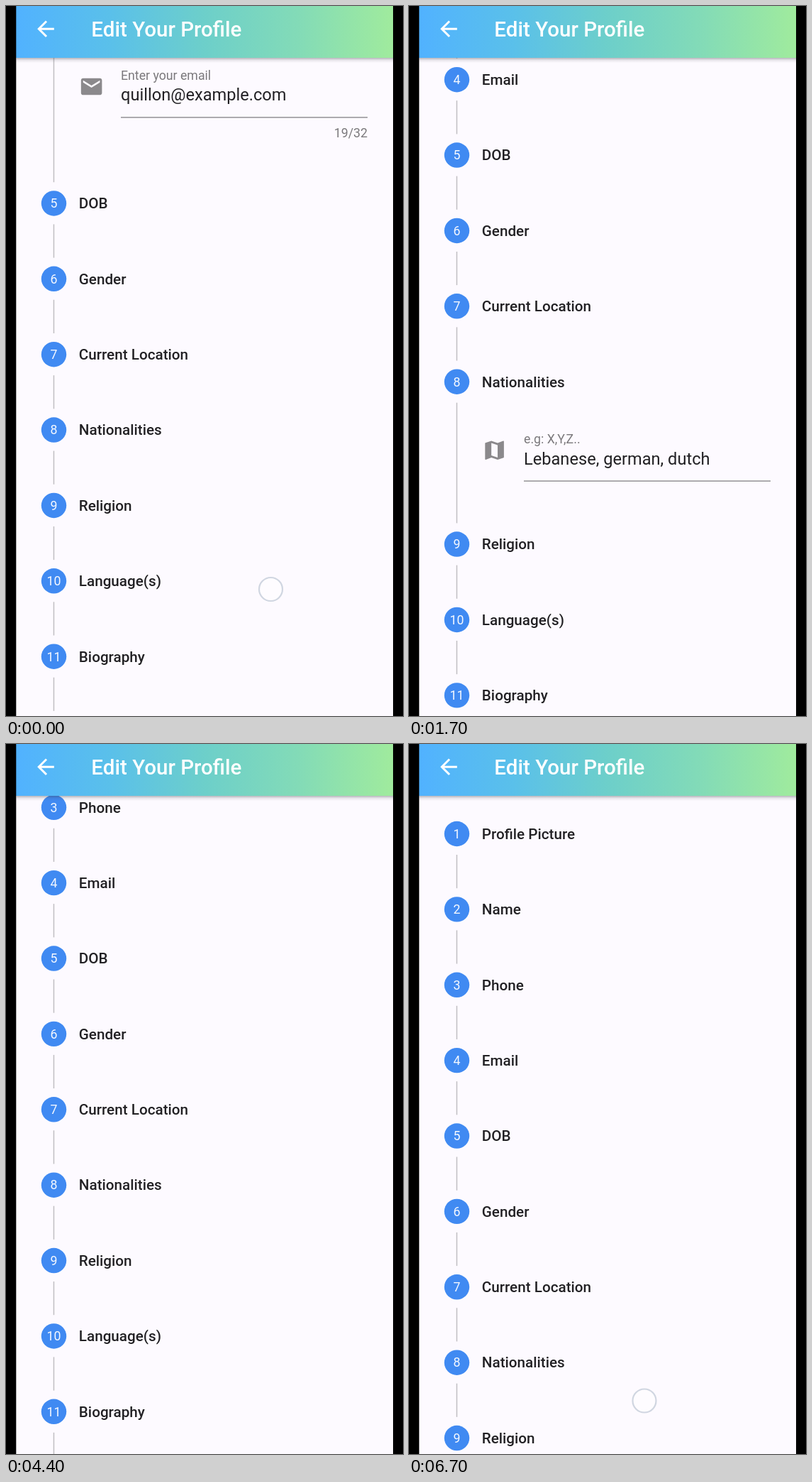
Write an HTML page with a canvas that moves like this. It is 560 px wide and 1000 px high and loops after 6800 ms.

```html
<!DOCTYPE html>
<html lang="en">
<head>
<meta charset="utf-8">
<title>Edit Your Profile</title>
<style>
  html, body { margin: 0; width: 100%; height: 100%; overflow: hidden; background: #000; }
  canvas { display: block; width: 560px; height: 1000px; }
</style>
</head>
<body>
<canvas id="stage" width="560" height="1000"></canvas>
<script>
const ctx = document.getElementById('stage').getContext('2d');
const LOOP = 6800, TICK = 100, TAP_LEAD = 500, TAP_TIME = 200;
const DP = 1.477, LEFT = 14.3, RIGHT = 546, WIDTH = RIGHT - LEFT, BAR = 73;
const FIRST = 126.5, PITCH = 106.38, DOT_X = 67.5;
const SMALL = 12 * DP, TITLE = 14 * DP, VALUE = 16 * DP, HEADING = 20 * DP;
const INK = '#222124', GREY = '#7b797c';

const STEPS = ['Profile Picture', 'Name', 'Phone', 'Email', 'DOB', 'Gender',
  'Current Location', 'Nationalities', 'Religion', 'Language(s)', 'Biography'];

const ICONS = {
  back: 'M20 11H7.83l5.59-5.59L12 4l-8 8 8 8 1.41-1.41L7.83 13H20v-2z',
  mail: 'M20 4H4c-1.1 0-1.99.9-1.99 2L2 18c0 1.1.9 2 2 2h16c1.1 0 2-.9 2-2V6c0-1.1-.9-2-2-2zm0 4l-8 5-8-5V6l8 5 8-5v2z',
  map: 'M20.5 3l-.16.03L15 5.1 9 3 3.36 4.9c-.21.07-.36.25-.36.48V20.5c0 .28.22.5.5.5l.16-.03L9 18.9l6 2.1 5.64-1.9c.21-.07.36-.25.36-.48V3.5c0-.28-.22-.5-.5-.5zM15 19l-6-2.11V5l6 2.11V19z'
};

// Expanded content by step number
const FIELDS = {
  4: { icon: 'mail', label: 'Enter your email', value: 'quillon@example.com', count: '19/32', extra: 154.5 },
  8: { icon: 'map', label: 'e.g: X,Y,Z..', value: 'Lebanese, german, dutch', extra: 122.5 }
};

// Tapping a step opens it and throws the list back to the top; then comes one fling
const VISITS = [
  { at: 0, open: 4, from: 428.6, to: 236, fling: 700 },
  { at: 1000, open: 8, to: 395.4, fling: 1300 },
  { at: 3000, open: 11, to: 250, wait: 800, fling: 600 },
  { at: 4500, open: 8, to: 352.5, fling: 900 },
  { at: 6100, open: 9, to: 0, fling: 1 }
];

// Fingers that drag the list
const DRAGS = [
  { at: 0, x: 373.5, y: 821.5 },
  { at: 2000, x: 467, y: 483.5 },
  { at: 6600, x: 332, y: 925 }
];

const visitAt = t => VISITS.filter(v => v.at <= t).pop();
const touching = (t, start) => t >= start && t < start + TAP_TIME;

function scrollAt(t) {
  const { at, from = 0, to, wait = 0, fling } = visitAt(t);
  const p = Math.min(1, Math.max(0, (t - at - wait) / fling));
  return from + (to - from) * (1 - Math.pow(1 - p, 2.588));
}

function stepY(n, open, scroll) {
  const extra = n > open && FIELDS[open] ? FIELDS[open].extra : 0;
  return FIRST + (n - 1) * PITCH + extra - scroll;
}

function text(str, x, y, size, color, weight = 400, align = 'left') {
  ctx.font = `${weight} ${size}px Roboto, sans-serif`;
  ctx.fillStyle = color;
  ctx.textAlign = align;
  ctx.fillText(str, x, y);
}

function rect(x, y, w, h, color) {
  ctx.fillStyle = color;
  ctx.fillRect(x, y, w, h);
}

function disc(x, y, r, color) {
  ctx.beginPath();
  ctx.arc(x, y, r, 0, 2 * Math.PI);
  ctx.fillStyle = color;
  ctx.fill();
}

function icon(name, cx, cy, color) {
  ctx.save();
  ctx.translate(cx - 12 * DP, cy - 12 * DP);
  ctx.scale(DP, DP);
  ctx.fillStyle = color;
  ctx.fill(new Path2D(ICONS[name]));
  ctx.restore();
}

function gradient(x, y, colors) {
  const [x0, x1] = x, [y0, y1] = y;
  const g = ctx.createLinearGradient(x0, y0, x1, y1);
  colors.forEach((c, i) => g.addColorStop(i / (colors.length - 1), c));
  return g;
}

function drawField({ icon: name, label, value, count }, y) {
  icon(name, 120.6, y + 96.5, '#8b898c');
  text(label, 162, y + 87, SMALL, GREY);
  text(value, 162, y + 116.4, VALUE, INK);
  rect(162, y + 139, 348, 1.7, '#a09ea1');
  if (count) text(count, 510, y + 168.2, SMALL, GREY, 400, 'right');
}

function drawSteps(open, scroll) {
  STEPS.forEach((name, i) => {
    const n = i + 1;
    const y = stepY(n, open, scroll);
    rect(66.7, y + 29.5, 1.5, stepY(n + 1, open, scroll) - y - 59.2, '#c1bfc2');
    disc(DOT_X, y, 12 * DP, '#408af2');
    text(n, DOT_X, y + 6.3, SMALL, '#f4f8ff', 400, 'center');
    text(name, 102.8, y + 7.3, TITLE, INK, 500);
    if (n === open && FIELDS[n]) drawField(FIELDS[n], y);
  });
}

function drawBar() {
  // Clear first so that no page colour shows along the bar's edge
  rect(0, 0, 560, BAR, '#000');
  rect(LEFT, 0, WIDTH, BAR, gradient([LEFT, RIGHT], [0, 0],
    ['#51b2ff', '#5ac0ea', '#6dcfca', '#83dbb7', '#a0eb9d']));
  rect(LEFT, BAR, WIDTH, 7, gradient([0, 0], [BAR, BAR + 7],
    ['rgba(60,60,70,.36)', 'rgba(60,60,70,.1)', 'rgba(60,60,70,0)']));
  icon('back', 56, 32.3, '#fff');
  text('Edit Your Profile', 120.3, 43.4, HEADING, '#fff', 500);
}

function drawFinger(x, y) {
  disc(x, y, 16.5, 'rgba(255,255,255,.5)');
  ctx.lineWidth = 2.2;
  ctx.strokeStyle = '#d0d6e1';
  ctx.stroke();
}

function drawTouches(t, open, scroll) {
  for (const { at, x, y } of DRAGS) {
    if (touching(t, at)) drawFinger(x, y + scrollAt(at) - scroll);
  }
  // Each later visit begins with a tap on its step
  for (const visit of VISITS.slice(1)) {
    if (touching(t, visit.at - TAP_LEAD)) drawFinger(322.5, stepY(visit.open, open, scroll) + 7);
  }
}

function draw(t) {
  const { open } = visitAt(t);
  const scroll = scrollAt(t);
  rect(0, 0, 560, 1000, '#000');
  rect(LEFT, 0, WIDTH, 1000, '#fdfaff');
  drawSteps(open, scroll);
  drawBar();
  drawTouches(t, open, scroll);
}

const begin = performance.now();
function frame() {
  const t = (performance.now() - begin) % LOOP;
  draw(Math.floor(t / TICK) * TICK);
  requestAnimationFrame(frame);
}
frame();
</script>
</body>
</html>
```
